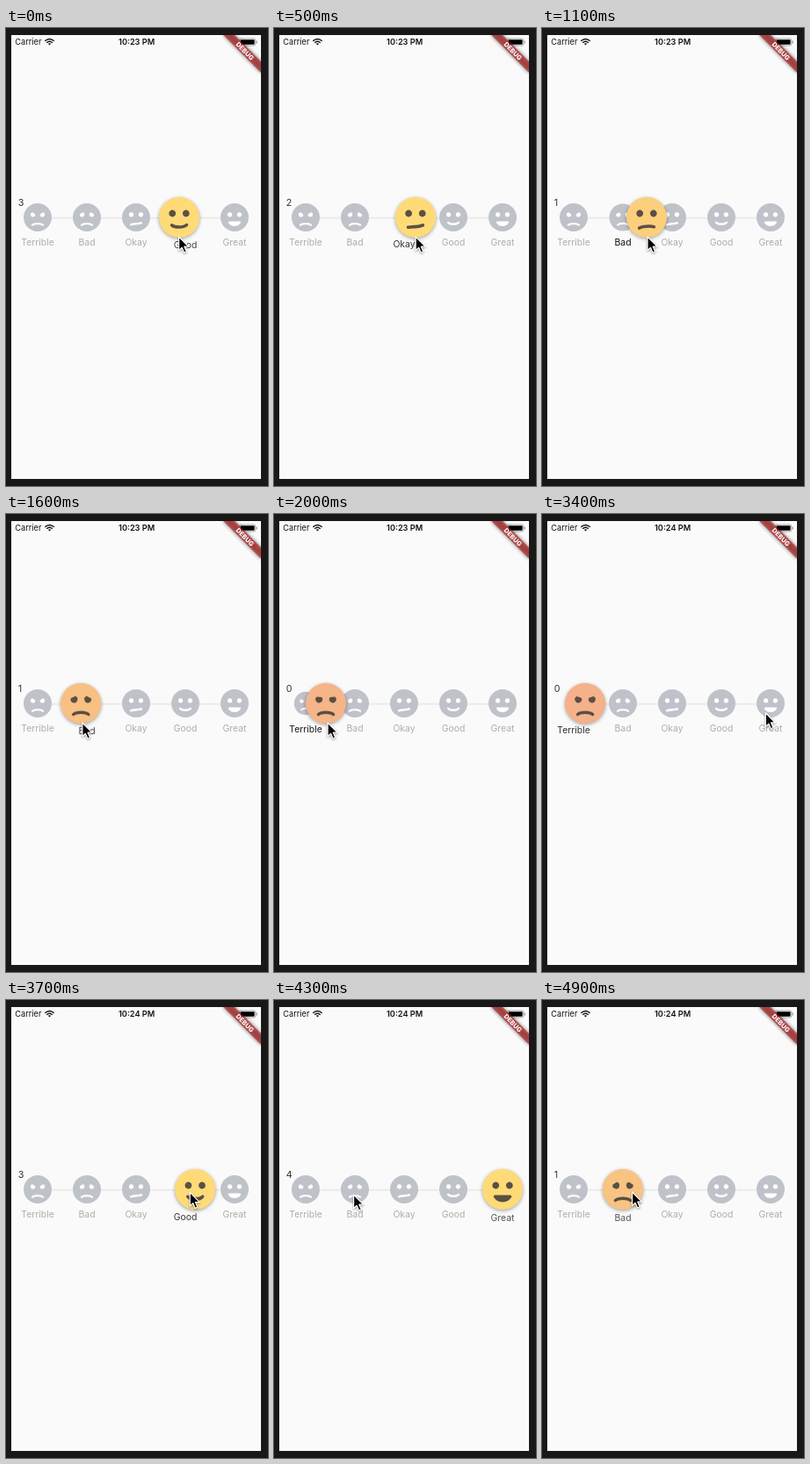
An HTML page for the animation above (5000 ms loop, 298 by 520 pixels).

```html
<!DOCTYPE html>
<html lang="en">
<head>
<meta charset="utf-8">
<title>Review slider</title>
<style>
  html, body { margin: 0; width: 100%; height: 100%; overflow: hidden; background: #181818; }
  svg { display: block; width: 298px; height: 520px; }
  text { font-family: Inter, "Open Sans", sans-serif; }
  .bar text { font-size: 9.2px; fill: #111; }
  .label { font-size: 10.4px; text-anchor: middle; }
  .mouth { stroke-width: 3.5; stroke-linecap: round; stroke-linejoin: round; }
  .small { fill: #fff; stroke: #fff; }
  .big { fill: #5a5044; stroke: #5a5044; }
  .eyes { stroke: none; }
  #cursor { filter: drop-shadow(0 1px 1px rgba(0, 0, 0, .4)); }
</style>
</head>
<body>
<svg viewBox="0 0 298 520">
  <defs>
    <clipPath id="screen"><rect x="6" y="8" width="284" height="504"/></clipPath>
    <filter id="soft" x="-50%" y="-50%" width="200%" height="200%"><feGaussianBlur stdDeviation="2"/></filter>
  </defs>
  <rect width="298" height="520" fill="#181818"/>
  <rect x="6" y="8" width="284" height="504" fill="#fafafa"/>

  <g class="bar">
    <text x="10.3" y="19.2">Carrier</text>
    <g fill="none" stroke="#111" stroke-width="1.5">
      <path d="M44.3 14.8Q49.5 10.2 54.7 14.8M46.2 16.7Q49.5 13.9 52.8 16.7"/>
      <path d="M49.5 19.6L47.8 17.8Q49.5 16.6 51.2 17.8Z" fill="#111" stroke="none"/>
    </g>
    <text id="clock" x="148.6" y="19.2" text-anchor="middle" font-weight="600"></text>
    <rect x="265.4" y="12" width="18.4" height="8" rx="2" fill="none" stroke="#888" stroke-width=".7"/>
    <rect x="266.6" y="13.2" width="16" height="5.6" rx="1" fill="#000"/>
    <rect x="284.6" y="14.5" width="1" height="3" fill="#888"/>
  </g>

  <g clip-path="url(#screen)">
    <g transform="translate(290 8) rotate(45)">
      <rect x="-30.3" y="21.2" width="60.6" height="9.1" fill="#000" opacity=".5" filter="url(#soft)"/>
      <rect x="-30.3" y="21.2" width="60.6" height="9.1" fill="#b71c1c" opacity=".63"/>
      <text y="28.4" text-anchor="middle" font-size="7.3" font-weight="800" fill="#fff">DEBUG</text>
    </g>
  </g>

  <rect x="36" y="214.7" width="224" height="2" fill="#ebebeb"/>
  <text id="score" x="13.7" y="202" font-size="10.8" fill="#333"></text>
  <g id="stops"></g>
  <g id="head">
    <circle cy="1.2" r="23" fill="#000" opacity=".36" filter="url(#soft)"/>
    <circle id="skin" r="23"/>
    <g id="face" class="big"><path class="eyes"/><path class="mouth"/></g>
  </g>
  <path id="cursor" d="M0 0V15.6L3.5 12.3L6 18L8.7 16.8L6.2 11.2H11Z"
        stroke="#fff" stroke-width="1.2" stroke-linejoin="round"/>
</svg>

<script>
const LOOP = 5000, STEP = 100, FIRST = 36, GAP = 56, MID = 215;
const names = ['Terrible', 'Bad', 'Okay', 'Good', 'Great'];
const angry = [243, 171, 140], happy = [255, 219, 119];

const $ = id => document.getElementById(id);
const clamp = (v, lo, hi) => Math.max(lo, Math.min(hi, v));
const mix = (a, b, k) => a.map((v, i) => v + (b[i] - v) * k);
const move = (el, x, y, s = 1) => el.setAttribute('transform', `translate(${x} ${y}) scale(${s})`);

// eased progress from 0 to 1 between two times
function rise(t, start, end) {
  const u = clamp((t - start) / (end - start), 0, 1);
  return u < .5 ? 2 * u * u : 1 - 2 * (1 - u) ** 2;
}

// slow drag to the left that stops at the first face
function dragX(t) {
  const s = t / 1000;
  return Math.max(FIRST, 197 - 73.2 * s + 2.1 * s * s);
}

const headX = t => dragX(t) + 4 * GAP * rise(t, 3300, 3885) - 3 * GAP * rise(t, 4400, 4900);

function pointer(t) {
  const out = rise(t, 2400, 3050), back = rise(t, 3340, 4300), nudge = rise(t, 4400, 4900);
  return [
    dragX(t) + Math.min(t, 2400) / 800 + 217 * out - 165 * back + 12 * nudge - .4,
    237 - 11 * out - 5 * back - 8 * Math.sin(Math.PI * back) - 3 * nudge
  ];
}

// circle with its top cut off by a tilted lid
function eye(side, tilt, lid) {
  const r = 3.9, open = Math.acos(lid), turn = -side * tilt * Math.PI / 180;
  const at = a => `${side * 7.8 + r * Math.sin(a)} ${-4.5 - r * Math.cos(a)}`;
  return `M${at(turn + open)}A${r} ${r} 0 1 1 ${at(turn - open)}Z`;
}

// mood runs from 0 (terrible) to 4 (great)
function drawFace(g, mood) {
  const tilt = 35 - 70 * Math.min(1, mood);
  const lid = clamp(.7 + .55 * (mood - 1), .7, .999);
  const end = clamp(14.5 - 2 * mood, 8.2, 12.5);
  const skew = 1.5 * Math.max(0, 1 - Math.abs(mood - 2));
  const bend = 3.6 * clamp(mood - 2, -.85, 1.1);
  const open = Math.max(0, mood - 3);
  const up = end + bend - 4 * open, low = end + bend + 2 * open;
  const left = `-8.5 ${end + skew}`, right = `8.5 ${end - skew}`;
  g.children[0].setAttribute('d', eye(-1, tilt, lid) + eye(1, tilt, lid));
  g.children[1].setAttribute('d', `M${left}C-5 ${up} 5 ${up} ${right}C5 ${low} -5 ${low} ${left}Z`);
}

$('stops').innerHTML = names.map(n => `<g><circle r="23" fill="#bfc2c9"/>
  <g class="small"><path class="eyes"/><path class="mouth"/></g></g><text class="label">${n}</text>`).join('');
const stops = [...$('stops').querySelectorAll(':scope > g')];
const labels = [...$('stops').querySelectorAll('text')];
stops.forEach((g, i) => drawFace(g.children[1], i));

function draw(t) {
  const x = headX(t), mood = (x - FIRST) / GAP, active = Math.round(mood);
  stops.forEach((g, i) => {
    const d = Math.min(1, 2 * Math.abs(mood - i)), cx = FIRST + GAP * i;
    const tone = 85 - 70 * d;
    move(g, cx, MID, d * 16 / 23);
    move(labels[i], cx, 251.2 - 4 * d);
    labels[i].setAttribute('fill', i === active ? `rgb(${tone},${tone},${tone})` : '#adadad');
  });
  move($('head'), x, MID);
  $('skin').setAttribute('fill', `rgb(${mix(angry, happy, Math.min(1, mood / 2))})`);
  drawFace($('face'), mood);
  move($('cursor'), ...pointer(t));
  $('score').textContent = active;
  $('clock').textContent = t < 3000 ? '10:23 PM' : '10:24 PM';
}

const begin = performance.now();
function tick() {
  const t = (performance.now() - begin) % LOOP;
  draw(Math.floor(t / STEP) * STEP);
  requestAnimationFrame(tick);
}
tick();
</script>
</body>
</html>
```
